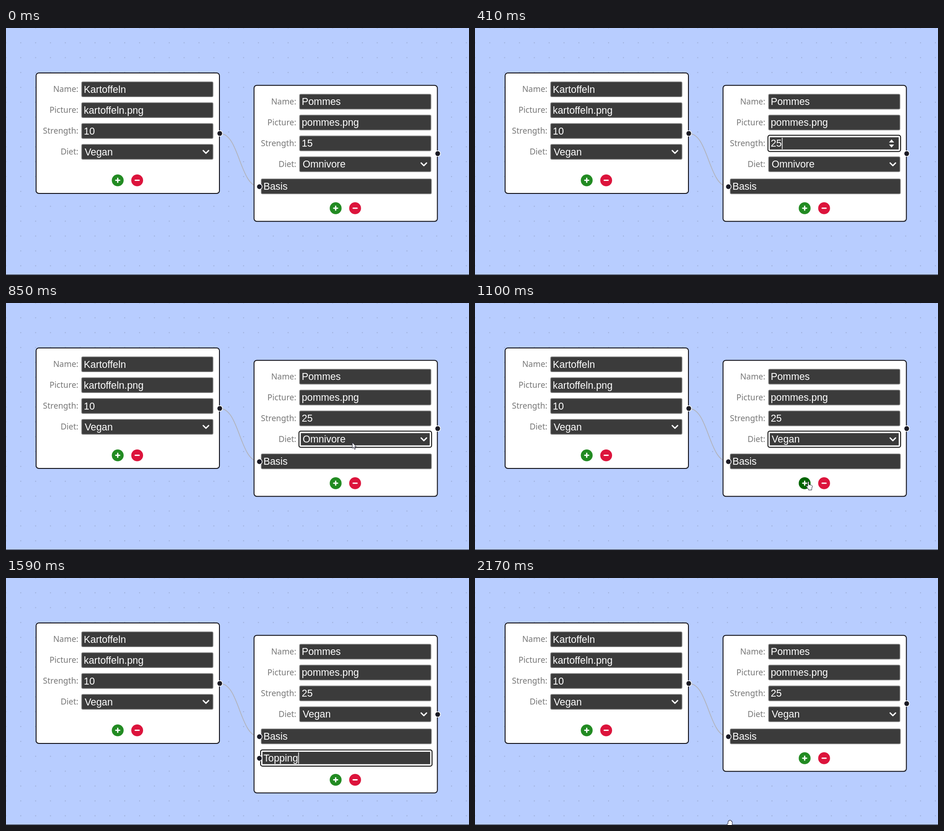
An HTML page for the animation above (2270 ms loop, 1000 px wide and 533 px high).

```html
<!DOCTYPE html>
<html lang="en">
<head>
<meta charset="utf-8">
<title>Recipe node editor</title>
<style>
  html, body { margin: 0; height: 100%; overflow: hidden; background: #b8cdff; }
  svg { display: block; width: 100vw; height: 100vh; }
  .label { font: 17.6px "Noto Sans", sans-serif; fill: #777; text-anchor: end; }
  .value { font: 21.39px "Liberation Sans", Arial, sans-serif; fill: #fff; white-space: pre; }
  .field { fill: #3b3b3b; stroke: #7b7b7b; stroke-width: 1.5; }
  .ring { fill: #fff; stroke: #101010; stroke-width: 2; }
  .node { fill: #fff; stroke: #15151c; stroke-width: 2; }
  .handle { fill: #1a1a24; stroke: #fff; stroke-width: 1.5; }
  .edge { fill: none; stroke: #b1b1b7; stroke-width: 1.6; }
  .icon { fill: none; stroke: #fff; stroke-width: 2.8; stroke-linecap: round; stroke-linejoin: round; }
  .cursor { fill: #fff; stroke: #26263a; stroke-width: 1; stroke-linejoin: round; }
</style>
</head>
<body>
<svg viewBox="0 0 1000 533" preserveAspectRatio="none">
  <defs>
    <pattern id="dots" x="15.9" y="15.9" width="32.08" height="32.08" patternUnits="userSpaceOnUse">
      <circle cx="16" cy="16" r=".85" fill="#8593b5"/>
    </pattern>
  </defs>
  <rect width="1000" height="533" fill="#b8cdff"/>
  <rect width="1000" height="533" fill="url(#dots)"/>
  <rect y="532" width="1000" height="1" fill="#24262c"/>
  <path class="edge" d="M461.7 227.5C504.5 227.5 504.5 342.5 547.4 342.5"/>
  <g id="scene"></g>
</svg>
<script>
const LOOP = 2270, ROW = 46.6;
const scene = document.getElementById('scene');

const cursors = {
  arrow: 'M0 0V12.5L2.8 10L4.8 14.8L6.8 14L4.8 9.2H8.6Z',
  beam: 'M0 0H5M2.5 0V17M0 17H5',
  hand: 'M4 1.5C4-.3 6.6-.3 6.6 1.5V7L12 8.3C13.6 8.8 14 9.6 13.8 11L12.6 15.5V18.5H5.5V16.5L1 11C0 9.4 2 8.6 3 9.7L4 10.8Z',
  grab: 'M2.6 8V3.2C2.6 1.9 4.3 1.9 4.3 3.2V1.6C4.3.3 6.2.3 6.2 1.6V1.2C6.2 0 8.1 0 8.1 1.2V2C8.1.9 9.9.9 9.9 2V4C9.9 3 11.6 3 11.6 4V9L10 15H4.5L.6 9.5C0 8 1.6 7.2 2.6 8Z'
};

// Each step changes part of the state and holds until the next one.
const steps = [
  [0, { strength: '15', diet: 'Omnivore', topping: null, focus: '', hover: '', caret: false, cursor: null }],
  [100, { cursor: ['beam', 716, 262] }],
  [200, { focus: 'strength', caret: true, cursor: ['beam', 690, 241] }],
  [300, { strength: '2', cursor: null }],
  [410, { strength: '25' }],
  [500, { cursor: ['beam', 730, 254] }],
  [580, { focus: '', caret: false, cursor: ['arrow', 764, 300] }],
  [620, { cursor: ['arrow', 760, 306] }],
  [640, { cursor: ['arrow', 755, 311] }],
  [850, { focus: 'diet', cursor: ['arrow', 748, 301] }],
  [950, { diet: 'Vegan', cursor: ['arrow', 733, 350] }],
  [1100, { hover: 'plus', cursor: ['hand', 714.7, 385] }],
  [1140, { hover: '', focus: '', topping: '', cursor: ['beam', 718, 381] }],
  [1210, { focus: 'topping', caret: true }],
  [1280, { topping: 'To', cursor: null }],
  [1350, { topping: 'Top' }],
  [1430, { topping: 'Topp' }],
  [1510, { topping: 'Toppin' }],
  [1590, { topping: 'Topping' }],
  [1690, { focus: '', caret: false, cursor: ['arrow', 680, 418] }],
  [1780, { cursor: ['arrow', 705, 430] }],
  [1880, { cursor: ['arrow', 732, 434] }],
  [1980, { hover: 'minus', cursor: ['hand', 744, 429.5] }],
  [2060, { hover: '', topping: null, cursor: ['grab', 706, 456] }],
  [2170, { cursor: ['grab', 544, 522] }]
];

const box = (cls, x, y, w, h, r) =>
  `<rect class="${cls}" x="${x}" y="${y}" width="${w}" height="${h}" rx="${r}"/>`;
const handle = (x, y) => `<circle class="handle" cx="${x}" cy="${y}" r="5.9"/>`;
const icon = d => `<path class="icon" d="${d}"/>`;

function field(x, y, w, text, focused, kind) {
  const body = focused
    ? box('ring', x - 1, y - 17.5, w + 2, 35, 4) +
      `<rect x="${x + 3}" y="${y - 13.3}" width="${w - 6}" height="26.6" rx="1" fill="#3b3b3b"/>`
    : box('field', x + .5, y - 16, w - 1, 32, 2.5);
  const right = x + w;
  const extra = kind === 'select' ? icon(`M${right - 21.5} ${y - 2.8}l5.8 5.8l5.8-5.8`)
    : kind === 'number' && focused
      ? `<path fill="#fff" d="M${right - 24} ${y - 2}l5.5-6.5l5.5 6.5zm0 4.5h11l-5.5 6.5z"/>` : '';
  const id = focused ? 'id="active"' : '';
  return body + `<text ${id} class="value" x="${x + (kind === 'select' ? 7 : 5)}" y="${y + 7.4}">${text}</text>` + extra;
}

function button(x, y, color, plus) {
  return `<circle cx="${x}" cy="${y}" r="12.8" fill="${color}"/>` +
    icon(`M${x - 4.2} ${y}h8.4` + (plus ? `M${x} ${y - 4.2}v8.4` : ''));
}

function node(x, y, height, data, inputs, state) {
  const rows = [['Name', data.name], ['Picture', data.picture],
    ['Strength', data.strength, 'number'], ['Diet', data.diet, 'select']];
  const active = key => state && state.focus === key;
  const hovered = key => state && state.hover === key;
  let out = box('node', x, y, 396, height, 6);
  rows.forEach(([label, text, kind], i) => {
    const cy = y + 35.2 + i * 45;
    out += `<text class="label" x="${x + 91.3}" y="${cy + 5.6}">${label}:</text>` +
      field(x + 98, cy, 284.5, text, active(label.toLowerCase()), kind);
  });
  inputs.forEach((text, i) => {
    const cy = y + 218 + i * ROW;
    out += field(x + 15.2, cy, 368.3, text, i && active('topping')) + handle(x + 11.6, cy + .6);
  });
  const by = y + height - 28.3;
  return out + button(x + 176.3, by, hovered('plus') ? '#006400' : '#228b22', true) +
    button(x + 218.3, by, hovered('minus') ? '#b22222' : '#dc143c') +
    handle(x + 396.7, y + height / 2 + .5);
}

function render(state) {
  const inputs = state.topping === null ? ['Basis'] : ['Basis', state.topping];
  let out = node(65, 97, 260, { name: 'Kartoffeln', picture: 'kartoffeln.png', strength: '10', diet: 'Vegan' }, []) +
    node(535.7, 123.8, 293.4 + (inputs.length - 1) * ROW,
      { name: 'Pommes', picture: 'pommes.png', strength: state.strength, diet: state.diet }, inputs, state);
  if (state.cursor) {
    const [shape, x, y] = state.cursor;
    out += `<path class="cursor" transform="translate(${x} ${y})" d="${cursors[shape]}"/>`;
  }
  scene.innerHTML = out;
  if (state.caret) {
    const text = document.getElementById('active');
    const x = +text.getAttribute('x') + text.getComputedTextLength() + .3;
    const y = +text.getAttribute('y') - 19.5;
    scene.insertAdjacentHTML('beforeend', `<rect x="${x}" y="${y}" width="1.5" height="24.5" fill="#fff"/>`);
  }
}

let shown = -1;
function tick() {
  const time = performance.now() % LOOP;
  const index = steps.filter(([start]) => start <= time).length - 1;
  if (index !== shown) {
    shown = index;
    render(Object.assign({}, ...steps.slice(0, index + 1).map(step => step[1])));
  }
  requestAnimationFrame(tick);
}
tick();
</script>
</body>
</html>
```
